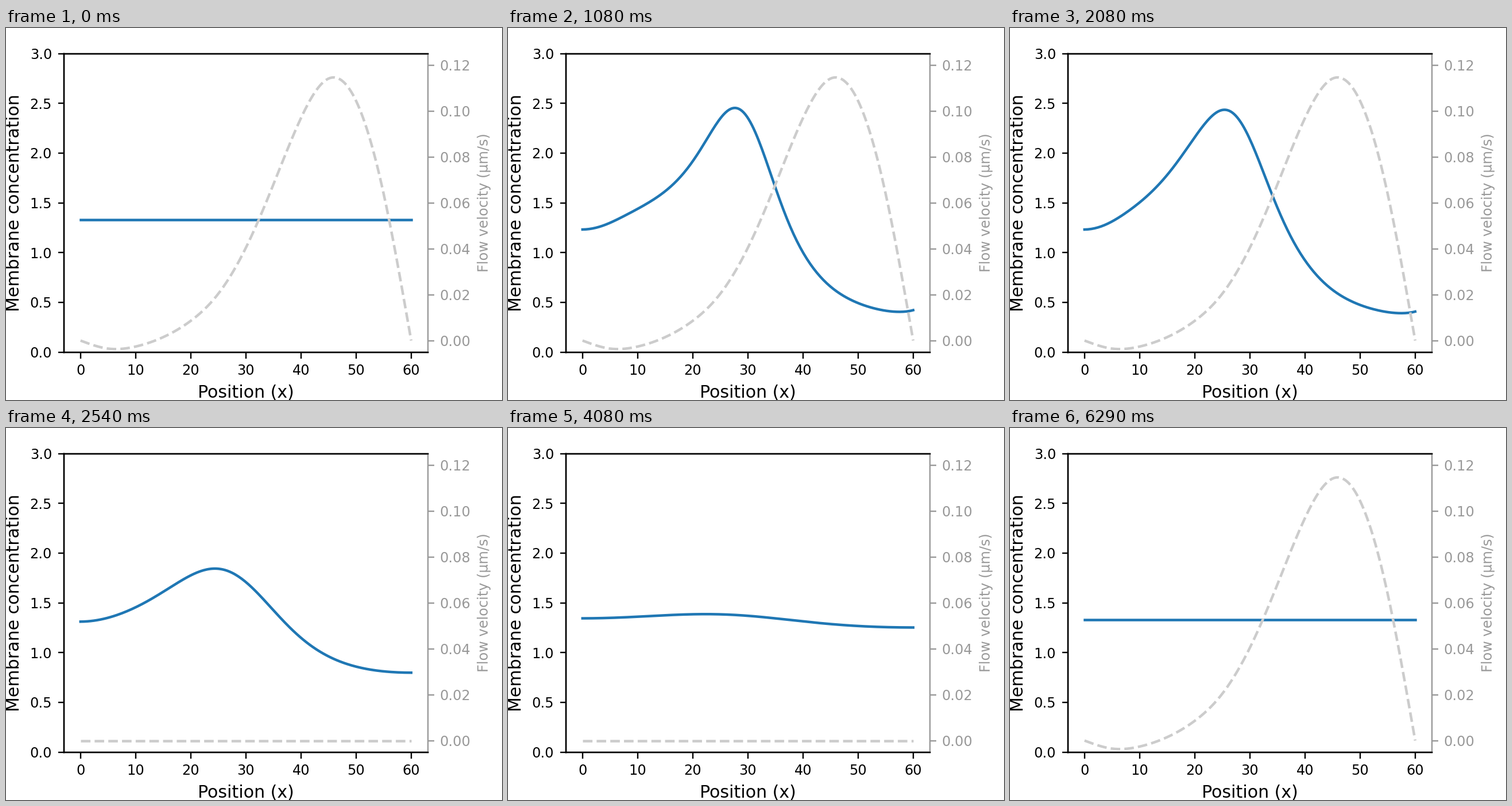
These frames come from a looping animation (864 by 648 pixels, 6.33 s). A matplotlib script:

```python
import numpy as np
import matplotlib.pyplot as plt
from matplotlib.animation import FuncAnimation

W, H, DPI = 864, 648, 216
LOOP_MS, FRAMES = 6330, 152

# Model: diffusion, leftward flow and exchange with a uniform cytoplasm
LENGTH, POINTS = 60, 200
DIFF, K_OFF, A_EQ = 0.1, 0.005, 1.332
DT, SECONDS_PER_FRAME = 0.1, 10
FLOW_FRAMES = 50

GREY, PALE = "0.6", "0.8"

plt.rcParams["font.family"] = "DejaVu Sans"


def natural_spline(x, knots, values):
    """Natural cubic spline through evenly spaced knots."""
    h = knots[1] - knots[0]
    n = len(knots)
    m = np.zeros(n)
    system = 4 * np.eye(n - 2) + np.eye(n - 2, k=1) + np.eye(n - 2, k=-1)
    m[1:-1] = np.linalg.solve(system, 6 * np.diff(values, 2) / h**2)
    i = np.clip((x // h).astype(int), 0, n - 2)
    t = x / h - i
    s = 1 - t
    bend = (s**3 - s) * m[i] + (t**3 - t) * m[i + 1]
    return s * values[i] + t * values[i + 1] + bend * h**2 / 6


def simulate(flow, dx):
    """Concentration profile for every shown moment."""
    a = np.full(POINTS, A_EQ)
    profiles = [a.copy()]
    steps = round(SECONDS_PER_FRAME / DT)
    for k in range(FRAMES - 2):
        v = flow if k < FLOW_FRAMES else np.zeros(POINTS)
        for _ in range(steps):
            grad = np.zeros(POINTS + 1)
            grad[1:-1] = (a[1:] - a[:-1]) / dx
            moved = np.append(v * a, 0)
            change = DIFF * (grad[1:] - grad[:-1]) + moved[1:] - moved[:-1]
            a = a + DT * (change / dx + K_OFF * (A_EQ - a))
        profiles.append(a)
    # The loop closes on the resting state
    profiles.append(profiles[0])
    return profiles


x = np.linspace(0, LENGTH, POINTS)
speeds = np.array([0, -3.5, -2.6, 1.5, 8.6, 20.4, 40.4,
                   68, 96.9, 114.1, 104.4, 64, 0]) / 1000
flow = natural_spline(x, np.arange(0, LENGTH + 1, 5), speeds)
profiles = simulate(flow, x[1] - x[0])

fig = plt.figure(figsize=(W / DPI, H / DPI), dpi=DPI, facecolor="white")
ax = fig.add_axes([101 / W, 1 - 564.5 / H, 633.6 / W, 520 / H])
ax.set_xlim(-3, 63)
ax.set_ylim(0, 3)
ax.set_xticks(range(0, 61, 10))
ax.set_yticks(np.arange(0, 3.1, 0.5))
ax.tick_params(labelsize=8)
ax.set_xlabel("Position (x)", fontsize=10)
ax.set_ylabel("Membrane concentration", fontsize=10)

ax2 = ax.twinx()
ax2.set_ylim(-0.005, 0.125)
ax2.set_yticks(np.arange(0, 0.13, 0.02))
ax2.tick_params(axis="y", labelsize=8, color=GREY, labelcolor=GREY)
ax2.spines["right"].set_color(GREY)
ax.spines["right"].set_visible(False)
ax2.set_ylabel("Flow velocity (μm/s)", fontsize=8, color=GREY)

conc_line, = ax.plot(x, profiles[0], color="tab:blue", lw=1.5)
flow_line, = ax2.plot(x, flow, color=PALE, lw=1.5, ls="--")


def update(k):
    flowing = k <= FLOW_FRAMES or k == FRAMES - 1
    conc_line.set_ydata(profiles[k])
    flow_line.set_ydata(flow if flowing else np.zeros(POINTS))
    return conc_line, flow_line


anim = FuncAnimation(fig, update, frames=FRAMES, interval=LOOP_MS / FRAMES,
                     repeat=True, repeat_delay=0)
plt.show()
```
